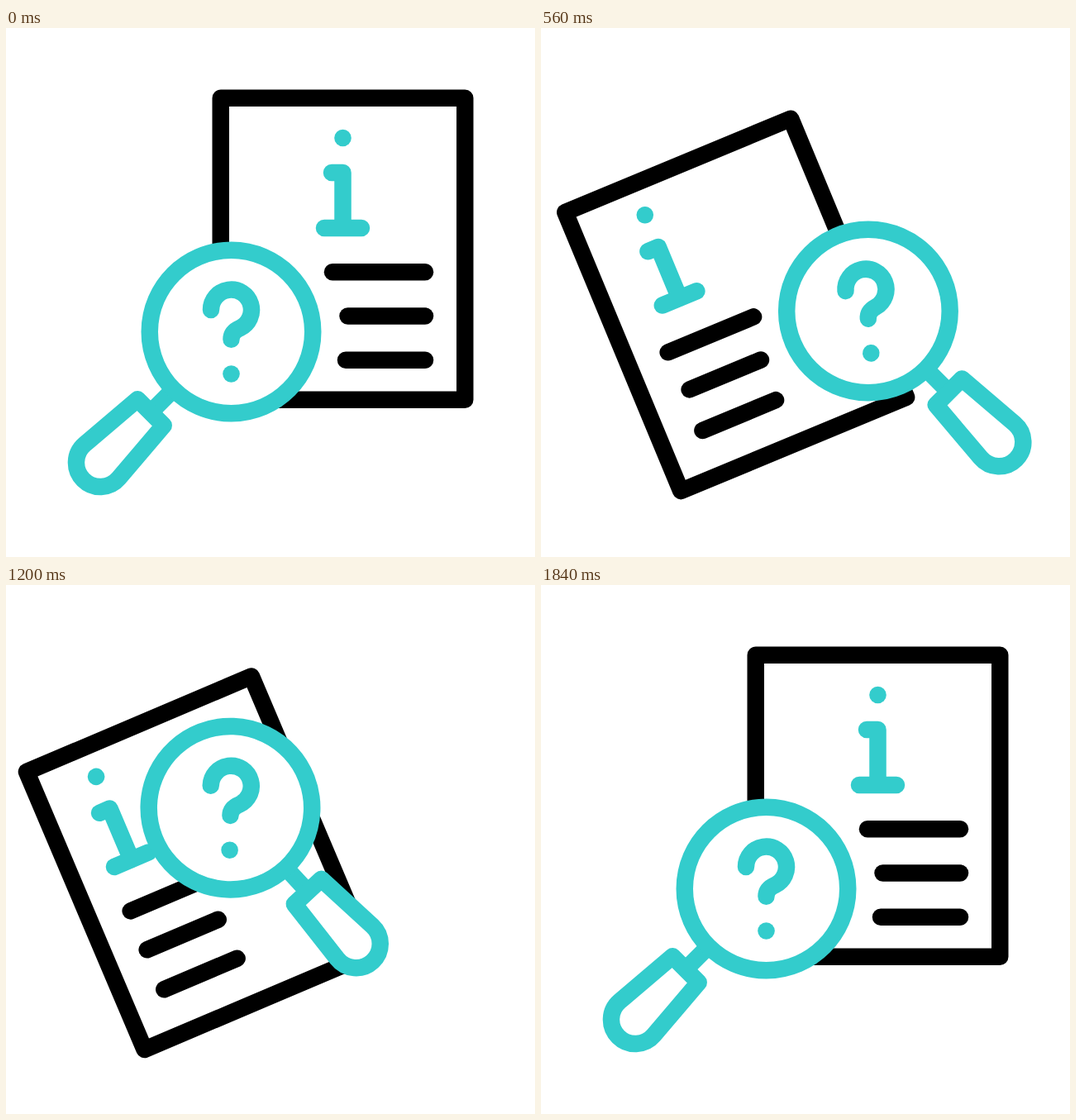
Animation, 640 px wide and 640 px high, one loop 2 s. Source, as an HTML page:

```html
<!DOCTYPE html>
<html lang="en">
<head>
<meta charset="utf-8">
<title>Searching a document</title>
<style>
  html, body { margin: 0; width: 100%; height: 100%; overflow: hidden; background: #fff; }
  svg { display: block; width: 100%; height: 100%; }
  .ink, .teal { stroke-width: 20.5; stroke-linecap: round; stroke-linejoin: round; fill: none; }
  .ink { stroke: #000; }
  .teal { stroke: #3cc; }
  .paper { fill: #fff; }
  .dot { fill: #3cc; stroke: none; }
</style>
</head>
<body>
<svg viewBox="0 0 640 640">
  <g id="page" class="ink">
    <rect class="paper" x="-147.75" y="-182.5" width="295.5" height="365"/>
    <path id="line0" d="M-12.5 28H99.5"/>
    <path id="line1" d="M6 81.2H99.5"/>
    <path id="line2" d="M3.5 134.5H99.5"/>
    <g id="info" class="teal">
      <circle class="dot" cy="-134.2" r="10.3"/>
      <path d="M-13.5 -92.2H0V-25.2M-22.5 -25.2H22.5"/>
    </g>
  </g>
  <g id="glass" class="teal">
    <path d="M0 98V138" stroke-linecap="butt"/>
    <path class="paper" d="M-22.3 138H22.3L29.1 221.5A29.2 29.2 0 1 1 -29.1 221.5Z"/>
    <circle class="paper" r="98.75"/>
  </g>
  <g id="query" class="teal">
    <path d="M-24.5 -26.5A24.5 24.5 0 1 1 10.4 -4.3C4 -1.5 0 3 0 9.2"/>
    <circle class="dot" cy="51" r="10.3"/>
  </g>
</svg>
<script>
const LOOP = 2000, STEP = 40, START = 120, END = 1840;
const HOME = { x: 272.5, y: 367.5 };
const RING = { x: 310, y: 346.7, radius: 86.1, from: -2.8, sweep: 257 };

const place = (id, x, y, turn = 0, pivotY = 0) => document.getElementById(id)
  .setAttribute('transform', `translate(${x} ${y}) rotate(${turn} 0 ${pivotY})`);

const phase = (t, from, to) => Math.min(1, Math.max(0, (t - from) / (to - from)));
const ease = (t, from, to) => {
  const s = phase(t, from, to);
  return s * s * (3 - 2 * s);
};
// Rises from 0 to 1 and falls back
const bump = (t, from, to) => Math.sin(Math.PI * phase(t, from, to)) ** 2;

// 0 = upright page, 1 = tilted page; some parts return a little later
const swing = (t, outEnd) => ease(t, START, outEnd) - ease(t, 1360, 1824);
const lateSwing = (t, outEnd) => ease(t, START, outEnd) - ease(t, 1400, END);

function onRing(progress) {
  const a = (RING.from + RING.sweep * progress) * Math.PI / 180;
  return { x: RING.x + RING.radius * Math.cos(a), y: RING.y + RING.radius * Math.sin(a) };
}

// Point on a line from a to b, bowed sideways by (dx, dy) halfway
function bow(a, b, p, dx, dy) {
  const k = 4 * p * (1 - p);
  return { x: a.x + (b.x - a.x) * p + dx * k, y: a.y + (b.y - a.y) * p + dy * k };
}

function drawPage(t) {
  const move = lateSwing(t, 600);
  place('page', 407.5 - 175.25 * move, 267.25 + 69 * move, -23 * swing(t, 600));

  const slide = (id, dx, dy, p) => place(id, dx * p, dy * p);
  slide('line0', -85.3, -6.4, swing(t, 560));
  slide('line1', -103.7, -8.6, swing(t, 640));
  slide('line2', -101, -9.7, lateSwing(t, 600));
  slide('info', -72.6, -10, swing(t, 720));
}

function drawGlass(t) {
  const out = ease(t, START, 566), circle = ease(t, 632, 1280), back = ease(t, 1385, END);
  const lens = out < 1 ? bow(HOME, onRing(0), out, 0, 4)
    : back > 0 ? bow(onRing(1), HOME, back, -16.6, -29.6)
    : onRing(circle);

  const sway = bump(t, 680, 1240);
  const turn = (-90 * out + 4 * circle) * (1 - back) - 32.6 * sway;
  const tilt = 24.5 * sway - 12 * bump(t, START, 680) - 7 * bump(t, 1360, END);
  place('glass', lens.x, lens.y, 45 + turn);
  place('query', lens.x, lens.y, tilt, 10);
}

const start = performance.now();
function tick() {
  const elapsed = (performance.now() - start) % LOOP;
  const t = Math.floor(elapsed / STEP) * STEP;
  drawPage(t);
  drawGlass(t);
  requestAnimationFrame(tick);
}
tick();
</script>
</body>
</html>
```
